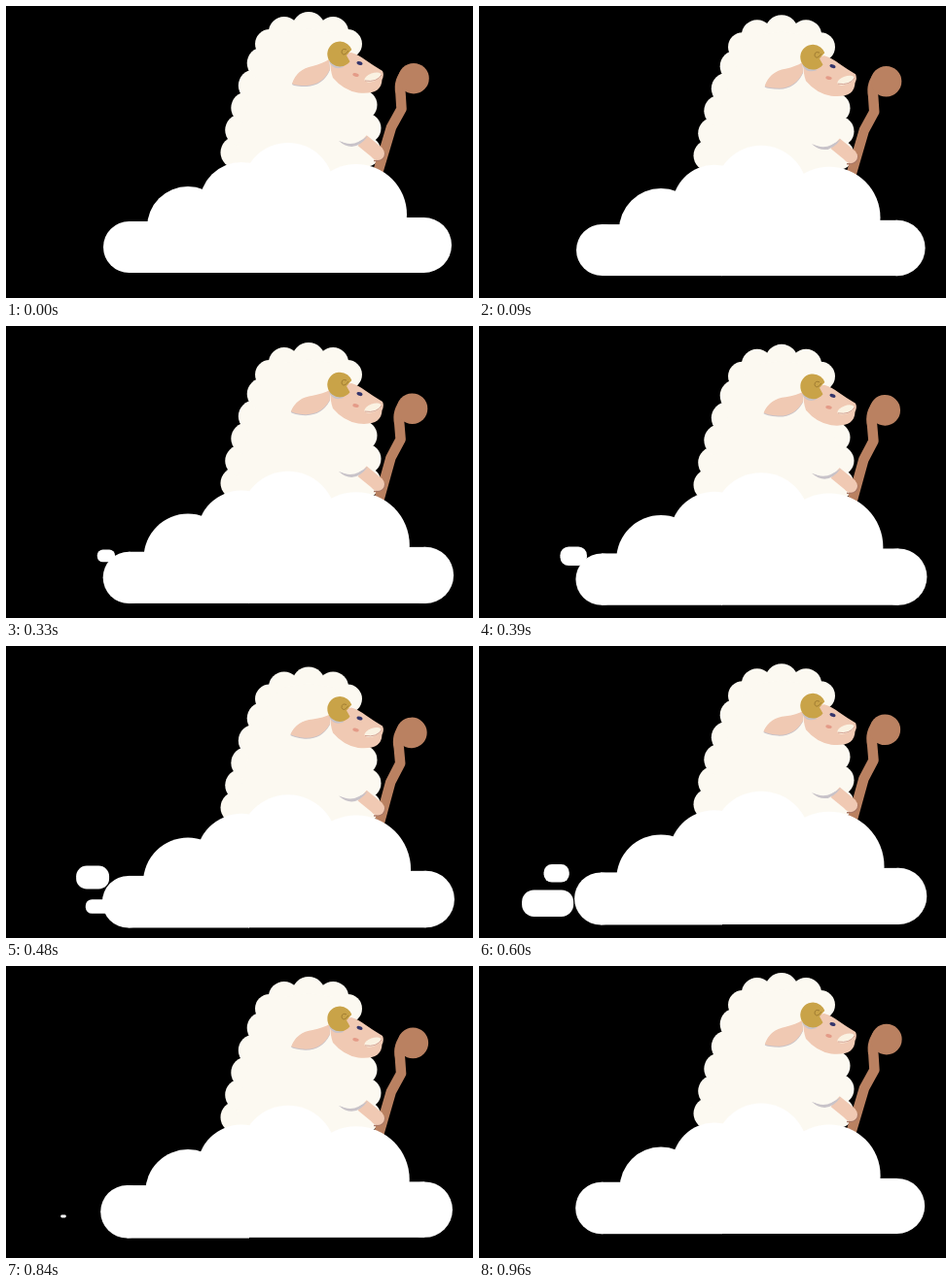
An HTML page with a canvas for the animation above (990 ms loop, 480 by 301 pixels).

```html
<!DOCTYPE html>
<html lang="en">
<head>
<meta charset="utf-8">
<title>Sheep on a cloud</title>
<style>
html, body { margin: 0; width: 100%; height: 100%; overflow: hidden; background: #000; }
canvas { display: block; }
</style>
</head>
<body>
<canvas id="stage" width="480" height="301"></canvas>
<script>
const ctx = document.getElementById('stage').getContext('2d');
const LOOP = 990, STEP = 30, TURN = 480;
const WOOL = '#fcf9f1', SKIN = '#f0c9b3', WOOD = '#ba8161', GOLD = '#c9a348', SHADE = '#c8c3c9';

// Sinks until TURN, then rises again; both ways nearly linear.
function bob(t) {
  const k = t < TURN ? t / TURN : (LOOP - t) / (LOOP - TURN);
  return k + .03 * Math.sin(Math.PI * k);
}

// One swell per loop; a higher power moves its peak later.
const swell = (t, power) => Math.sin(Math.PI * (t / LOOP) ** power);

function circle(x, y, r) {
  ctx.beginPath();
  ctx.arc(x, y, r, 0, Math.PI * 2);
  ctx.fill();
}

function ellipse(x, y, rx, ry, angle, color) {
  ctx.fillStyle = color;
  ctx.beginPath();
  ctx.ellipse(x, y, rx, ry, angle, 0, Math.PI * 2);
  ctx.fill();
}

function shape(d, color) {
  ctx.fillStyle = color;
  ctx.fill(new Path2D(d));
}

function line(d, color, width) {
  ctx.strokeStyle = color;
  ctx.lineWidth = width;
  ctx.stroke(new Path2D(d));
}

// Circles joined by a polygon through their centres.
function blob(circles) {
  circles.forEach(c => circle(...c));
  ctx.beginPath();
  circles.forEach(([x, y]) => ctx.lineTo(x, y));
  ctx.fill();
}

function turned(x, y, angle, draw) {
  ctx.save();
  ctx.translate(x, y);
  ctx.rotate(angle);
  ctx.translate(-x, -y);
  draw();
  ctx.restore();
}

function woolCurls() {
  const curls = [[237, 190, 10]];
  for (let i = 0; i < 5; i++) curls.push([237 + 4 * i + .7 * i * i, 151 - 23 * i, 16.5]);
  for (let k = -2; k <= 2; k++) {
    curls.push([311 + 41.5 * Math.sin(.65 * k), 23 + 4 * k * k, 17 - Math.abs(k)]);
  }
  curls.push([358, 84, 6]);
  for (let i = 0; i < 3; i++) curls.push([366 + 6 * i - 2 * i * i, 102 + 24 * i, 15.5]);
  return curls.concat([[365, 190, 10]]);
}
const CURLS = woolCurls();

function drawHead(earTurn) {
  shape('M333 52Q333 66 336 74Q347 87 362 89.5Q386 92 386.5 76Q389 71 387 67Q377 61 370 56Q362 50 355 48Z', SKIN);
  const ear = 'M333 65Q326 81 309 82Q297 82 294 80Q299 65 315 62Q326 59 332 55Z';
  turned(332, 64, earTurn, () => {
    ctx.save();
    ctx.translate(0, 1);
    shape(ear, SHADE);
    ctx.restore();
    shape(ear, SKIN);
  });
  ellipse(377, 73.5, 9, 4.2, -.35, '#faf2e2');
  line('M369 77Q381 79 386 71', '#c98f80', .8);
  ellipse(363.5, 59, 3.1, 1.8, .35, '#34356c');
  ellipse(359.5, 71, 3.2, 1.8, .2, '#e49b88');
  shape('M332 57Q336 67 347 63L345 58Z', SHADE);
  ctx.fillStyle = GOLD;
  ctx.beginPath();
  ctx.arc(343.2, 49.5, 12.9, .65, Math.PI * 2 - .35);
  ctx.lineTo(350, 51);
  ctx.fill();
  line('M352 46Q347 53 345 48Q345 43 350 45', '#a17d32', 1);
}

function drawStaff(angle) {
  turned(388, 155, angle, () => {
    ctx.lineJoin = 'round';
    line('M412 68Q403 77 405.5 90L406.5 106L396 125L382 172', WOOD, 10.5);
    ctx.fillStyle = WOOD;
    circle(419, 74.7, 15.8);
  });
}

function drawArm() {
  line('M378 159.5Q390 160 389 151', '#a97766', 1.5);
  line('M366 138.5L382.5 152', SKIN, 14);
  ctx.fillStyle = SKIN;
  circle(382, 152, 7);
  shape('M342 139Q358 153 372 134Q357 145 342 139Z', SHADE);
  shape('M342 138Q357 148 371 133L356 120Z', WOOL);
}

const PUFFS = [
  { start: 240, life: 500, x: 72, travel: 40, power: 1.3, y: 222, drop: 7, w: 34, h: 24 },
  { start: 400, life: 455, x: 59, travel: 66, power: 3, y: 253, drop: 0, w: 54, h: 28 }
];

function drawPuffs(t, dy) {
  for (const puff of PUFFS) {
    const p = (t - puff.start) / puff.life;
    if (p <= 0 || p >= 1) continue;
    const size = Math.sin(Math.PI * p), w = puff.w * size, h = puff.h * size;
    const x = puff.x + puff.travel * (1 - p) ** puff.power;
    const y = puff.y + puff.drop * (1 - p) ** 3 + dy;
    ctx.beginPath();
    ctx.roundRect(x - w / 2, y - h / 2, w, h, Math.min(w, h) * .45);
    ctx.fill();
  }
}

function drawCloud(t, u, dy) {
  const early = swell(t, 1), mid = swell(t, 1.4), late = swell(t, 3);
  const left = [126.5 - 2.2 * late, 248.5 + .98 * dy, 26.5 + .8 * late];
  const right = [429.5 + 2.2 * u, 246.5 + .94 * dy, 28.5 + .75 * u];
  blob([
    left,
    [187, 228 + dy, 42 + 4 * early],
    [242, 204 + dy, 43 + 4 * mid],
    [290, 188 + dy, 47 + 3.5 * mid],
    [360, 215 + dy, 52 + 4.5 * mid],
    right
  ]);
  const bottomLeft = left[1] - left[2], bottomRight = right[1] - right[2];
  ctx.fillRect(left[0], bottomLeft, 250 - left[0], left[2] * 2);
  ctx.fillRect(249, bottomRight, right[0] - 249, right[2] * 2);
}

function draw(t) {
  const u = bob(t), dy = 15.5 * u;
  ctx.fillStyle = '#000';
  ctx.fillRect(0, 0, 480, 301);

  ctx.save();
  ctx.translate(0, dy);
  ctx.fillStyle = WOOL;
  blob(CURLS);
  drawHead(.06 * (u + swell(t, 1.4)));
  drawStaff(-.026 * u);
  drawArm();
  ctx.restore();

  ctx.fillStyle = '#fff';
  drawPuffs(t, dy);
  drawCloud(t, u, dy);
}

function tick() {
  const t = performance.now() % LOOP;
  draw(Math.floor(t / STEP) * STEP);
  requestAnimationFrame(tick);
}
tick();
</script>
</body>
</html>
```
